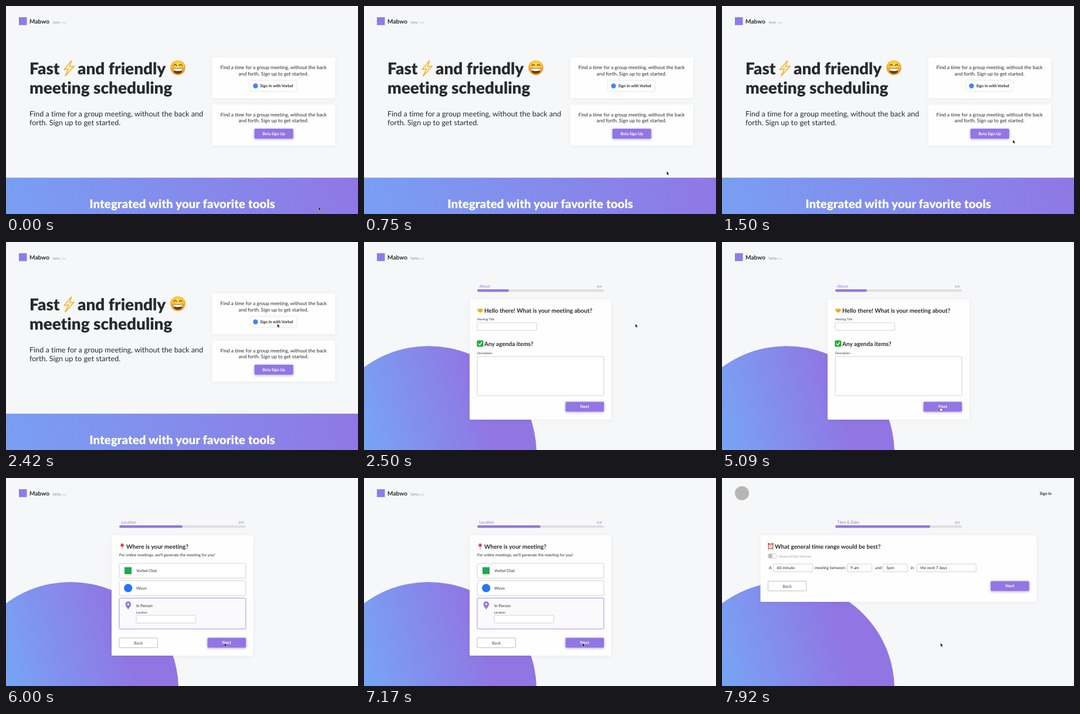
Animation, 600 px wide and 356 px high, one loop 8 s. Source, as an HTML page:

```html
<!DOCTYPE html>
<html lang="en">
<head>
<meta charset="utf-8">
<title>Meeting scheduler</title>
<style>
  html, body { margin: 0; width: 100%; height: 100%; overflow: hidden; background: #f6f7f9; }
  svg { display: block; width: 600px; height: 356px; font-family: Lato, sans-serif;
    text-rendering: geometricPrecision; font-variant-ligatures: none; }
  .card { fill: #fefefe; filter: drop-shadow(0 1px 3px #0000000d); }
  .button { fill: #9276e4; filter: drop-shadow(0 1px 2px #7b62c899); }
  .field { fill: #fff; stroke: #c8c8cb; stroke-width: .8; }
</style>
</head>
<body>
<svg id="stage" viewBox="0 0 600 356"></svg>
<script>
const LOOP = 8000, TO_ABOUT = 2500, TO_LOCATION = 5700, TO_TIME = 7340;
const INK = '#292a2c', VIOLET = '#9276e4';
const stage = document.getElementById('stage');

const text = (x, y, size, words, { weight = 400, fill = INK, anchor = 'start' } = {}) =>
  `<text x="${x}" y="${y}" font-size="${size}" font-weight="${weight}" fill="${fill}" text-anchor="${anchor}">${words}</text>`;
const box = (kind, x, y, w, h, extra = '') =>
  `<rect class="${kind}" x="${x}" y="${y}" width="${w}" height="${h}" rx="1.5" ${extra}/>`;
const dot = (x, y, r, fill) => `<circle cx="${x}" cy="${y}" r="${r}" fill="${fill}"/>`;
const path = (d, fill, stroke = 'none', width = 1) =>
  `<path d="${d}" fill="${fill}" stroke="${stroke}" stroke-width="${width}" stroke-linecap="round" stroke-linejoin="round"/>`;
const button = (x, y, w, h, label, size = 7.1) => box('button', x, y, w, h) +
  text(x + w / 2, y + h / 2 + 2.5, size, label, { weight: 700, fill: '#fff', anchor: 'middle' });
const backButton = (x, y) => box('field', x, y, 65.5, 16.5, 'style="stroke:#aeaeb2"') +
  text(x + 32.7, y + 10.8, 7.1, 'Back', { weight: 700, fill: '#77777a', anchor: 'middle' });
const title = (x, y, words) => text(x, y, 27.9, words, { weight: 900 });
const heading = (x, y, words) => text(x, y, 10.08, words, { weight: 700 });
const brand = betaSize => `<rect x="22" y="19.2" width="13.5" height="13.5" fill="#8d7ce8"/>` +
  heading(40, 30, 'Mabwo') + text(80, 30, betaSize, 'beta', { fill: '#8b8b90' }) +
  text(94, 30, 4.2, 'v1.0', { fill: '#aaaab0' });

const signUpCard = y => box('card', 351.5, y, 209.5, 70) +
  text(456, y + 20.1, 8.4, 'Find a time for a group meeting, without the back', { anchor: 'middle' }) +
  text(456, y + 30.5, 8.4, 'and forth. Sign up to get started.', { anchor: 'middle' });

const smiley = dot(293, 105.6, 12.7, 'url(#face)') +
  path('M284.3 106 Q293 107.6 301.7 106 Q301.2 116 293 116 Q284.8 116 284.3 106Z', '#6b3a16') +
  path('M285 106.7 Q293 108.2 301 106.7 L300.4 110.3 Q293 112 285.6 110.3Z', '#fff') +
  path('M286 102.3 Q288.5 97.5 291 102.3 M295 102.3 Q297.5 97.5 300 102.3', 'none', '#6b3a16', 1.3);

const bolt = path('M111.5 93.7 L98.7 108.8 L106.3 107.6 L100.8 119.8 L116.5 102.9 L108.6 103.9Z',
  '#fff0bd', '#f4a51f', 1.3);

const handshake = path('M192.8 115.5 L195.3 113.8 L198 114.8 L200.5 113.8 L203 115.6 L202 118.5 L198.8 121 L196.8 120.6 L193.5 118Z', '#f7b52c') +
  path('M197.5 116.2 L199 115.6 L201.5 118 M196 119 L197.5 120 M198 118 L199.5 119.5', 'none', '#c9791b', .6);

const check = '<rect x="192.7" y="168.7" width="10.4" height="10.4" rx="2" fill="#22b03c" stroke="#168c2b" stroke-width=".6"/>' +
  path('M195.2 174.2 L197.2 176.6 L200.8 171.4', 'none', '#fff', 1.4);

const pushpin = path('M198 117 V122.2', 'none', '#9a9ca0', .9) + dot(198, 115, 2.7, '#e0382f') + dot(197.2, 114.2, .7, '#ff9a8c');

const alarm = path('M79.8 120.5 L79 122 M86.2 120.5 L87 122', 'none', '#b9382d', 1.2) +
  dot(79.7, 113, 1.8, '#d9473b') + dot(86.3, 113, 1.8, '#d9473b') + dot(83, 117, 4.7, '#d9473b') +
  dot(83, 117, 3.4, '#f3f4f5') + path('M83 114.7 V117 L84.7 118', 'none', '#333', .6);

const landing = `<g class="page">${brand(5.88)}
  ${title(40, 117, 'Fast')}${bolt}${title(122, 117, 'and friendly')}${smiley}
  ${title(40, 150, 'meeting scheduling')}
  ${text(40, 188.8, 12.6, 'Find a time for a group meeting, without the back and')}
  ${text(40, 204, 12.6, 'forth. Sign up to get started.')}
  ${signUpCard(88)}${signUpCard(168.7)}
  ${box('card', 416, 127.5, 79.5, 18.3, 'style="filter:drop-shadow(0 .5px 1px #0003)"')}
  ${dot(425.3, 136.8, 4.2, '#4285f4')}${text(433.3, 139.2, 6.75, 'Sign In with Vorbel', { weight: 700 })}
  ${button(423.5, 210, 66, 17, 'Beta Sign Up', 6.72)}
  <rect y="293.8" width="600" height="63" fill="url(#banner)"/>
  ${text(300.5, 345.8, 20.5, 'Integrated with your favorite tools', { weight: 900, fill: '#fff', anchor: 'middle' })}</g>`;

const about = `<g class="page">${brand(6.72)}${box('card', 180, 98, 241.5, 206)}
  ${handshake}${heading(205, 121, 'Hello there! What is your meeting about?')}
  ${text(193, 134.2, 5.04, 'Meeting Title')}${box('field', 193, 138, 101.5, 13.2)}
  ${check}${heading(205, 177.7, 'Any agenda items?')}
  ${text(193, 192.2, 5.04, 'Description')}${box('field', 193, 196, 215.8, 67)}
  ${button(343.5, 273.5, 65.5, 16.7, 'Next')}</g>`;

const place = `<g class="page">${brand(6.72)}${box('card', 180, 98, 241.5, 206)}
  ${pushpin}${heading(205, 121, 'Where is your meeting?')}
  ${text(193, 134.2, 6.72, 'For online meetings, we’ll generate the meeting for you!')}
  ${box('field', 193, 146, 215.8, 25.3)}${box('field', 193, 175.8, 215.8, 25.3)}
  ${box('field', 193, 205.5, 215.8, 52.8, `style="stroke:${VIOLET};fill:#fafafc"`)}
  <rect x="202" y="152.6" width="12" height="12" fill="#1fa84f"/>${dot(208.2, 188.4, 7.1, '#2476f2')}
  ${path('M208.3 225 C206 221.5 203.5 219 203.5 216 A4.8 4.8 0 0 1 213.1 216 C213.1 219 210.6 221.5 208.3 225Z', VIOLET)}${dot(208.3, 216, 1.8, '#fff')}
  ${text(222, 161, 6.75, 'Vorbel Chat')}${text(222, 190.8, 6.75, 'Wuvo')}${text(222, 220.5, 6.75, 'In Person')}
  ${text(222, 231.6, 5.04, 'Location')}${box('field', 222, 235, 101.5, 13.2)}
  ${backButton(193, 273.8)}${button(343.5, 273.5, 65.5, 16.7, 'Next')}</g>`;

const row = [[80, 'A'], [93.5, '60 minute'], [158, 'meeting between'], [219, '9 am'], [261, 'and'],
  [280, '5pm'], [321.7, 'in'], [338, 'the next 7 days']];
const time = `<g class="page">${dot(34, 26, 12, '#b6b6b6')}${text(541.5, 28.6, 6.8, 'Sign In', { weight: 700 })}
  ${box('card', 65.5, 98, 470.5, 114)}
  ${alarm}${heading(90, 120.5, 'What general time range would be best?')}
  <rect x="78.2" y="129.4" width="15.5" height="8.4" rx="4.2" fill="#f4f4f5" stroke="#c2c2c5" stroke-width=".7"/>${dot(82.4, 133.6, 3.6, '#bcbcbf')}
  ${text(97, 135.5, 5.04, 'Advanced Date Selection', { fill: '#97979b' })}
  ${[[87.5, 67], [213.3, 42], [274.3, 42], [331.7, 101.5]].map(([x, w]) => box('field', x, 147.2, w, 13.4)).join('')}
  ${row.map(([x, words]) => text(x, 156.4, 6.8, words)).join('')}
  ${backButton(78.4, 176.7)}${button(458, 176.5, 65.5, 16.7, 'Next')}</g>`;

stage.innerHTML = `<defs>
    <linearGradient id="banner" gradientUnits="userSpaceOnUse" x1="-30" y1="390" x2="600" y2="200"><stop stop-color="#77a2f3"/><stop offset="1" stop-color="#9175e4"/></linearGradient>
    <linearGradient id="blob" gradientUnits="userSpaceOnUse" x1="-10" y1="330" x2="205" y2="270"><stop stop-color="#76a6f5"/><stop offset="1" stop-color="#9175e3"/></linearGradient>
    <radialGradient id="face" cy=".4"><stop stop-color="#ffe05a"/><stop offset=".7" stop-color="#fcc737"/><stop offset="1" stop-color="#eda024"/></radialGradient>
  </defs>
  <rect width="600" height="356" fill="#f6f7f9"/>
  <g id="wizard">${dot(110, 362, 184, 'url(#blob)')}
    <rect x="193" y="81" width="216" height="4.2" rx="2.1" fill="#dfdfe3"/>
    <rect id="bar" x="193" y="81" height="4.2" rx="2.1" fill="${VIOLET}"/>
    <text id="step" x="196.5" y="77.6" font-size="6.75" fill="${VIOLET}"></text>
    <text id="count" x="405" y="77.8" font-size="5.04" font-weight="700" fill="${VIOLET}" text-anchor="end"></text></g>
  ${landing}${about}${place}${time}
  <g id="cursor">
    <g id="arrow">${path('M0 0 V6.2 L1.4 4.9 L2.4 7 L3.4 6.5 L2.4 4.5 H4.3Z', '#111', '#fff', .4)}</g>
    <g id="hand">${path('M-.9 .6 Q0 -.4 .8 .6 V2.5 L3.4 3.1 Q4 3.5 3.7 5 L3 7 H-.6 L-2.4 4.5 Q-2.5 3.5 -.9 4.2Z', '#fff', '#222', .6)}</g>
  </g>`;

const get = id => document.getElementById(id);
const show = (el, visible) => { el.style.display = visible ? '' : 'none'; };
const pages = [...document.querySelectorAll('.page')];
const steps = ['', 'About', 'Location', 'Time &amp; Date'];
const smooth = p => p * p * (3 - 2 * p);
const linear = p => p;
const easeOut = p => 1 - (1 - p) ** 3;
const clamp = p => Math.min(1, Math.max(0, p));

// time, x, y, easing used to arrive
const route = [
  [100, 533, 344], [750, 516, 283, smooth], [1000, 516, 283, linear], [2200, 462.5, 140, smooth],
  [3340, 462.5, 140, linear], [3420, 446, 153, linear], [3500, 422, 174.5, linear], [4000, 372.5, 282.5, easeOut]
];

function cursorAt(t) {
  const i = route.findIndex(key => key[0] > t);
  if (i === 0) return route[0].slice(1, 3);
  if (i < 0) return route.at(-1).slice(1, 3);
  const [t0, x0, y0] = route[i - 1], [t1, x1, y1, ease] = route[i];
  const p = ease((t - t0) / (t1 - t0));
  return [x0 + (x1 - x0) * p, y0 + (y1 - y0) * p];
}

function draw(now) {
  const t = now % LOOP;
  const page = [TO_ABOUT, TO_LOCATION, TO_TIME].filter(start => t >= start).length;
  pages.forEach((el, i) => show(el, i === page));
  show(get('wizard'), page > 0);
  get('step').innerHTML = steps[page];
  get('count').textContent = `${page}/4`;
  const progress = 1 + smooth(clamp((t - TO_LOCATION) / 250)) + smooth(clamp((t - TO_TIME) / 250));
  get('bar').setAttribute('width', 54 * progress);

  const [x, y] = cursorAt(t);
  const hand = page === 1 && t > 3850;
  get('cursor').setAttribute('transform', `translate(${x} ${y})`);
  show(get('hand'), hand);
  show(get('arrow'), !hand);
  requestAnimationFrame(() => draw(performance.now()));
}
draw(0);
</script>
</body>
</html>
```
